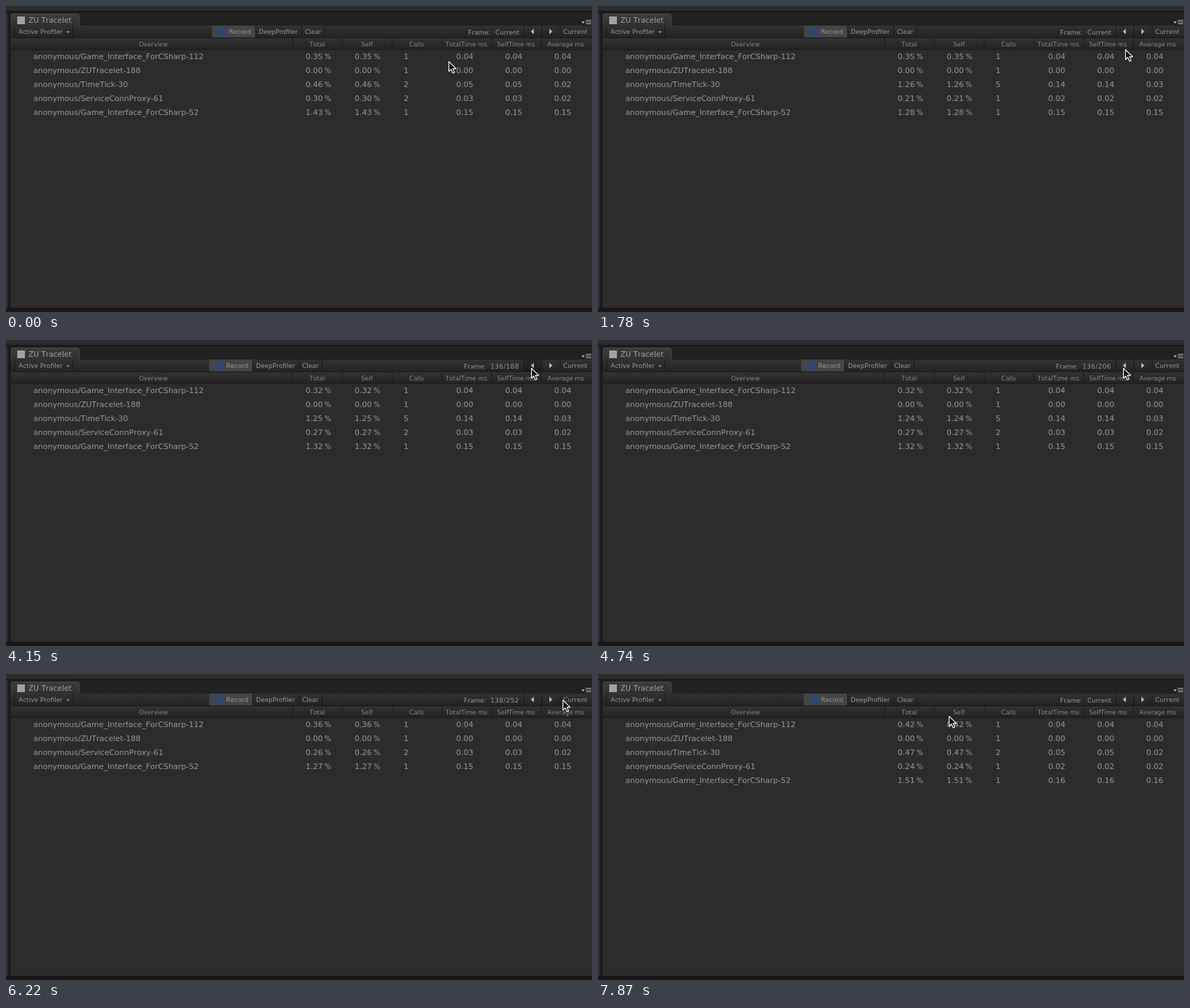
An HTML page for the animation above (8000 ms loop, 837 px wide and 438 px high).

```html
<!DOCTYPE html>
<html lang="en">
<head>
<meta charset="utf-8">
<title>Profiler panel</title>
<style>
  html, body { margin: 0; width: 100%; height: 100%; overflow: hidden; background: #2c2c2c; }
  svg { display: block; width: 837px; height: 438px; }
  text { font-family: "DejaVu Sans", sans-serif; font-kerning: none; white-space: pre; }
  .row { font-size: 11px; fill: #989898; }
  .pct { font-size: 9.8px; }
  .head { font-size: 8.75px; fill: #878787; text-anchor: middle; }
  .bar { font-size: 9px; fill: #989898; }
  .count { letter-spacing: .5px; }
  .tab { font-size: 10.6px; fill: #a4a4a4; }
  .icon { fill: #b4b4b4; }
</style>
</head>
<body>
<svg viewBox="0 0 837 438">
  <defs>
    <linearGradient id="barFill" x2="0" y2="1">
      <stop stop-color="#323232"/><stop offset="1" stop-color="#232323"/>
    </linearGradient>
    <linearGradient id="tabFill" x2="0" y2="1">
      <stop stop-color="#3c3c3c"/><stop offset="1" stop-color="#303030"/>
    </linearGradient>
  </defs>
  <rect width="837" height="438" fill="#2c2c2c"/>
  <rect y="7" width="837" height="2" fill="#181818"/>
  <rect x="3" y="9" width="834" height="20" fill="#212121"/>
  <rect x="3" y="7" width="4" height="426" fill="#1b1b1b"/>
  <path d="M7.5 28.5V14q0-2.5 2.5-2.5h92q2.5 0 2.5 2.5v14.5z" fill="url(#tabFill)" stroke="#4a4a4a"/>
  <rect x="16" y="15" width="11" height="11" fill="#a2a2a2"/>
  <text class="tab" x="32" y="24">ZU Tracelet</text>
  <path class="icon" d="M822 22h5l-2.5 3zM828 20h8v1h-8zM828 22.5h8v1h-8zM828 25h8v1h-8z"/>

  <rect x="7" y="28" width="830" height="17" fill="url(#barFill)"/>
  <rect x="7" y="45" width="830" height="1" fill="#191919"/>
  <rect x="7" y="46" width="830" height="16" fill="url(#barFill)"/>
  <rect x="7" y="62" width="830" height="1" fill="#1c1c1c"/>
  <g id="lines" fill="#1a1a1a"></g>
  <text class="bar" x="18" y="40">Active Profiler</text>
  <path d="M86 36h5l-2.5 3z" fill="#888"/>

  <g id="tools">
    <rect x="294" y="28" width="62" height="17" fill="#454545"/>
    <path d="M304 30l3 1v11l-3 1zM310 31l3-1v13l-3-1z" fill="#144a9c"/>
    <text class="bar" x="318.5" y="40">Record</text>
    <text class="bar" x="361" y="40">DeepProfiler</text>
    <text class="bar" x="427" y="40">Clear</text>
    <path d="M356 28h1v17h-1zM422 28h1v17h-1zM455 28h1v17h-1z" fill="#1a1a1a"/>
  </g>
  <text id="frameLabel" class="bar" y="41">Frame:</text>
  <text id="frameValue" class="bar" y="41"></text>
  <rect id="press" y="28" width="25" height="17" fill="#000" fill-opacity=".2"/>
  <path class="icon" d="M754 32.5v8l-4.5-4zM776 32.5v8l4.5-4z"/>
  <text class="bar" x="796" y="40">Current</text>

  <g id="heads"></g>
  <g id="rows"></g>
  <rect y="432" width="837" height="6" fill="#1a1518"/>
  <rect y="432" width="837" height="1" fill="#111"/>
  <path id="cursor" d="M.5 .5V14.5L3.8 11.5L6.2 17L8.6 16L6.2 10.6H10.8Z"
        fill="#111" stroke="#fff" stroke-width="1.1" stroke-linejoin="round"/>
</svg>
<script>
const LOOP = 8000, TICK = 148.3;
const PAUSE = 17, RESUME = 43, LAST_SAMPLE = 51;
const $ = id => document.getElementById(id);

function add(parent, tag, attrs, content = '') {
  const el = document.createElementNS('http://www.w3.org/2000/svg', tag);
  for (const key in attrs) el.setAttribute(key, attrs[key]);
  el.textContent = content;
  return parent.appendChild(el);
}

for (const x of [12, 95, 739, 765, 791]) add($('lines'), 'rect', {x, y: 28, width: 1, height: 17});
add($('heads'), 'text', {class: 'head', x: 210.5, y: 58}, 'Overview');
['Total', 'Self', 'Calls', 'TotalTime ms', 'SelfTime ms', 'Average ms'].forEach((name, i) => {
  add($('lines'), 'rect', {x: 409 + i * 71, y: 46, width: 1, height: 16});
  add($('heads'), 'text', {class: 'head', x: 444.5 + i * 71, y: 58}, name);
});

const rows = Array.from({length: 5}, (_, i) => {
  const y = 76 + i * 20;
  const group = add($('rows'), 'g', {class: 'row'});
  const cells = [add(group, 'text', {x: 39, y})];
  for (let n = 0; n < 6; n++) {
    const x = 428 + n * 70 + (n > 2 ? 5 : 0);
    cells.push(add(group, 'text', {x, y}));
    if (n < 2) add(group, 'text', {class: 'pct', x: x + 27, y}, '%');
  }
  return {group, cells};
});

function between(low, high, seed) {
  const v = Math.sin(seed * 12.9898) * 43758.5453;
  return low + (high - low) * (v - Math.floor(v));
}

const newestFrame = slot => Math.round(143 + (slot - 18) * 4.53);

// Steps back from 138 to 136, then forward again
const viewedFrame = slot =>
  136 + Math.min(2, Math.max(0, Math.floor((Math.abs(slot - 32.5) - 3.5) / 2)));

// Entries as [name, time in ms, calls]; each frame number gives its own costs
function entriesOf(frame) {
  const ticks = frame < 108 ? 2 : frame < 137 ? 5 : frame < 280 ? 0 : 2;
  const services = frame % 8 === 4 ? 1 : 2;
  return [
    ['Game_Interface_ForCSharp-112', between(.036, .044, frame), 1],
    ['ZUTracelet-188', 0, 1],
    ['TimeTick-30', ticks * .032 - .016, ticks],
    ['ServiceConnProxy-61', .018 + services * .0065, services],
    ['Game_Interface_ForCSharp-52', between(.147, .158, frame + .5), 1]
  ].filter(entry => entry[2]);
}

// Time, x, y
const path = [
  [0, 632, 79], [300, 632, 79], [1340, 753, 62], [1800, 753, 62], [2230, 751, 42],
  [4750, 750, 40], [5300, 780, 36], [5930, 780, 36], [6370, 800, 37], [6530, 800, 37],
  [6970, 774, 45], [7570, 589, 60], [7860, 501, 60], [LOOP, 501, 60]
];

function cursorAt(t) {
  const i = path.findIndex(point => point[0] > t);
  const [a, b] = [path[i - 1], path[i]];
  const u = (t - a[0]) / (b[0] - a[0]);
  const eased = u * u * (3 - 2 * u);
  return [1, 2].map(n => Math.round(a[n] + (b[n] - a[n]) * eased));
}

function renderRows(frame, newest) {
  const entries = entriesOf(frame);
  const span = between(10, 12, newest + .25);
  rows.forEach(({group, cells}, i) => {
    group.setAttribute('visibility', entries[i] ? 'visible' : 'hidden');
    if (!entries[i]) return;
    const [name, time, calls] = entries[i];
    const share = (time / span * 100).toFixed(2);
    const ms = time.toFixed(2);
    const values = ['anonymous/' + name, share, share, calls, ms, ms, (time / calls).toFixed(2)];
    cells.forEach((cell, n) => cell.textContent = values[n]);
  });
}

function renderToolbar(paused, frame, newest, step) {
  $('tools').setAttribute('transform', `translate(${paused ? -4 : 0})`);
  $('frameLabel').setAttribute('x', paused ? 654 : 660);
  const value = $('frameValue');
  value.setAttribute('x', paused ? 692 : 699);
  value.classList.toggle('count', paused);
  value.textContent = paused ? `${frame}/${newest}` : 'Current';
  $('press').setAttribute('x', step < 0 ? 740 : 766);
  $('press').setAttribute('visibility', step ? 'visible' : 'hidden');
}

function render(slot) {
  const paused = slot >= PAUSE && slot < RESUME;
  const repeats = !paused && slot % 14 === 2;
  const newest = newestFrame(Math.min(LAST_SAMPLE, repeats ? slot - 1 : slot));
  const frame = paused ? viewedFrame(slot) : newest;
  const step = paused ? frame - viewedFrame(slot - 1) : 0;
  renderRows(frame, newest);
  renderToolbar(paused, frame, newest, step);
  $('cursor').setAttribute('transform', `translate(${cursorAt(slot * TICK)})`);
}

const start = performance.now();
let shown = -1;
function loop() {
  const t = (performance.now() - start) % LOOP;
  const slot = Math.min(53, Math.floor((t + 8) / TICK));
  if (slot !== shown) render(shown = slot);
  requestAnimationFrame(loop);
}
loop();
</script>
</body>
</html>
```
